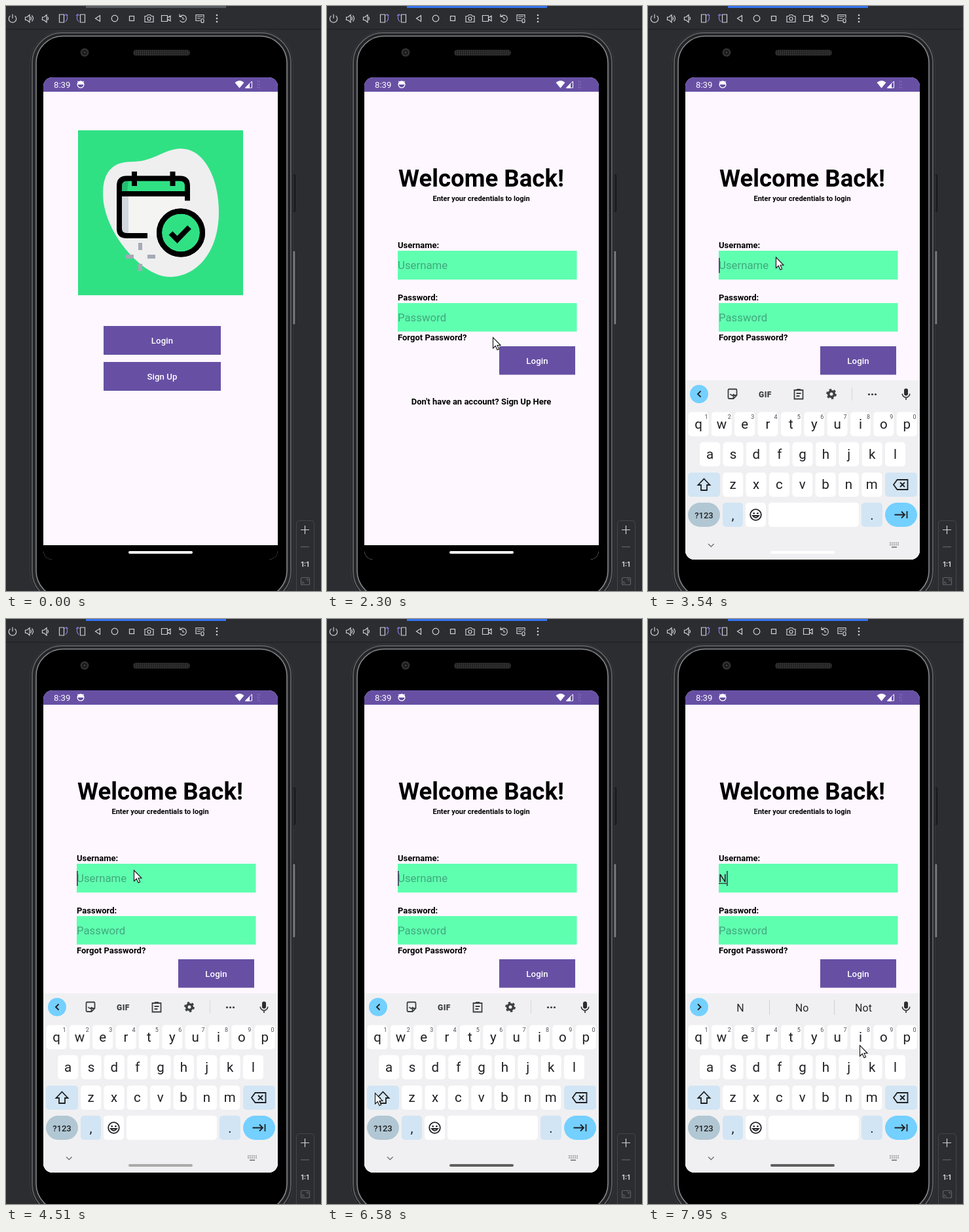
Recreate the animation shown at these times as an HTML page. Size 481 by 894 pixels, loop 8000 ms.

```html
<!DOCTYPE html>
<html lang="en">
<head>
<meta charset="utf-8">
<title>Login demo</title>
<style>
  html, body { margin: 0; width: 100%; height: 100%; overflow: hidden; background: #2b2d30; }
  svg { display: block; width: 481px; height: 894px; font-family: Roboto, sans-serif; }
  .mid { text-anchor: middle; }
  .bold { font-weight: 700; }
  .line { fill: none; stroke: #ced0d6; stroke-width: 1.2; }
  .ink { fill: none; stroke: #3c4043; stroke-width: 1.8; }
  .btn { fill: #fff; font-size: 13.2px; font-weight: 500; letter-spacing: .1px; text-anchor: middle; }
  .label { font-size: 13px; font-weight: 700; }
  .hint { font-size: 16.8px; fill: #40a87b; }
  .key { font-size: 20.5px; fill: #1f2023; text-anchor: middle; }
  .num { font-size: 9px; fill: #4a4d50; text-anchor: middle; }
  .word { font-size: 16px; fill: #26282b; text-anchor: middle; }
</style>
</head>
<body>
<svg viewBox="0 0 481 894" xmlns="http://www.w3.org/2000/svg">
  <defs>
    <clipPath id="glass"><rect x="57" y="109" width="358" height="737" rx="14"/></clipPath>
    <clipPath id="disc"><circle cx="267" cy="346" r="33"/></clipPath>
    <pattern id="mesh" width="3" height="3" patternUnits="userSpaceOnUse">
      <rect width="3" height="3" fill="#1c1c1c"/><circle cx="1.5" cy="1.5" r=".9" fill="#454545"/>
    </pattern>
  </defs>

  <!-- emulator toolbar -->
  <rect width="481" height="894" fill="#2b2d30"/>
  <rect y="35" width="481" height="1" fill="#1e1f22"/>
  <rect id="strip" x="122" width="214" height="3" fill="#5a5d63"/>
  <g class="line">
    <path d="M6.5 15a5.7 5.7 0 1 0 7 0M10 12.500v6.500"/>
    <path id="speaker" d="M29.500 17v4.500h2.500l4 3.500v-11.500l-4 3.500z"/>
    <path d="M37.500 16.500q2 2.500 0 5M39.500 14.500q4 4.500 0 9"/>
    <path d="M55.500 17v4.500h2.500l4 3.500v-11.500l-4 3.500zM63.500 16.500q2 2.500 0 5"/>
    <path d="M81.500 13h7v12h-7zM107.500 0" />
    <path d="M113.500 13h7v12h-7z"/>
    <path d="M90.500 24q5-4 2-10M89.500 14.500l2.500-2 2.500 2.500M111.500 24q-5-4-2-10M112 14.500l-2.500-2-2.500 2.500" stroke="#8478d8"/>
    <path d="M143.500 14.500v9l-7-4.500z"/>
    <circle cx="166" cy="19" r="4.800"/>
    <rect x="188.500" y="15.500" width="7" height="7"/>
    <path d="M212 15.500h3l1.500-2h4l1.500 2h3v9h-13z"/><circle cx="218.500" cy="19.500" r="2.500"/>
    <path d="M237.500 14.500h9v9h-9zM246.500 18l4.500-3v8l-4.500-3"/>
    <path d="M266 16a5.300 5.300 0 1 1-.5 6M265 12.500v4h4M270 17v3h2.500"/>
    <path d="M297 22.500h-7v-9h12v5M292 16h8M292 19h5"/><rect x="298" y="19.500" width="4" height="6" rx="2"/>
  </g>
  <g fill="#ced0d6"><circle cx="322" cy="14" r="1.300"/><circle cx="322" cy="19" r="1.300"/><circle cx="322" cy="24" r="1.300"/></g>

  <!-- handset -->
  <rect x="437.500" y="258" width="4" height="56" rx="1" fill="#232326" stroke="#111"/>
  <rect x="437.500" y="374" width="4.500" height="113" rx="1" fill="#77797c" stroke="#1a1a1c"/>
  <g fill="none">
    <rect x="37" y="38.500" width="401" height="875" rx="49" fill="#1d1e20" stroke="#3d3e41"/>
    <rect x="40" y="41" width="395" height="869" rx="46" stroke="#5b5d60" stroke-width="2"/>
    <rect x="43.500" y="44.500" width="387" height="862" rx="43" stroke="#25262a" stroke-width="3"/>
    <rect x="46" y="46" width="383" height="858" rx="41" fill="#000" stroke="#85878a" stroke-width="1.600"/>
  </g>
  <rect x="194" y="67" width="87" height="9" rx="4.500" fill="url(#mesh)"/>
  <circle cx="120" cy="71" r="6.500" fill="#303030"/><circle cx="120" cy="71" r="3.500" fill="#151515"/><circle cx="120" cy="71" r="1.500" fill="#444"/>

  <g clip-path="url(#glass)">
    <rect x="57" y="109" width="358" height="737" fill="#fef7ff"/>

    <g id="home">
      <rect x="110" y="190" width="252" height="252" fill="#30e184"/>
      <path d="M267 218C303 218 325 264 325 315C325 375 292 414 250 414C208 414 148 345 148 287C148 250 166 238 192 238C226 238 242 218 267 218Z" fill="#efefef"/>
      <path d="M173 263h104v34l-40 54h-64z" fill="#f4f4f3"/>
      <path d="M177 290h10v57h-10z" fill="#d2d7de"/>
      <path d="M177 267h96v17h-96z" fill="#30e184"/><path d="M177 267h10l-2 17h-8z" fill="#25bd70"/>
      <g fill="none" stroke="#000" stroke-width="8">
        <path d="M277 297.500V275Q277 263.500 266 263.500H184Q173 263.500 173 275V340Q173 351 184 351H216M173 287H277M196 253v22M254.500 253v22"/>
        <circle cx="267" cy="346.500" r="33" fill="#30e184"/>
        <path d="M259 310a38 38 0 0 0 3 72h-30v-72z" fill="#25bd70" stroke="none" clip-path="url(#disc)"/>
        <circle cx="267" cy="346.500" r="33"/>
        <path d="M251.500 347l10 10 18.500-19"/>
      </g>
      <path d="M202 362h6v11h-6zM202 394h6v11h-6zM183 380h12v6h-12zM216 380h12v6h-12z" fill="#a6a9b6"/>
      <path d="M149 489h179v44h-179zM149 544h179v44h-179z" fill="#6750a4"/>
      <text class="btn" x="238.500" y="516">Login</text>
      <text class="btn" x="238.500" y="571">Sign Up</text>
    </g>

    <g id="login" opacity="0">
      <rect x="57" y="131" width="358" height="715" fill="#fef7ff"/>
      <text class="mid bold" x="235.500" y="276" font-size="36.600">Welcome Back!</text>
      <text class="mid bold" x="235.500" y="298" font-size="11">Enter your credentials to login</text>
      <path d="M108 374h273.500v44h-273.500zM108 454h273.500v43.500h-273.500z" fill="#5fffb0"/>
      <text class="label" x="108" y="370">Username:</text>
      <text class="label" x="108" y="450">Password:</text>
      <text class="label" x="108" y="511">Forgot Password?</text>
      <text class="label mid" x="235.500" y="609">Don't have an account? Sign Up Here</text>
      <text id="user" class="hint" x="108" y="402">Username</text>
      <rect id="under" x="108" y="403.500" width="12" height="1.200" fill="#222"/>
      <rect id="caret" y="385" width="1.800" height="23" fill="#4d4668"/>
      <text class="hint" x="108" y="482">Password</text>
      <rect x="263" y="520" width="116" height="43.500" fill="#6750a4"/>
      <text class="btn" x="321" y="547">Login</text>
    </g>

    <rect x="57" y="109" width="358" height="22" fill="#6750a4"/>
    <text x="73" y="125" font-size="13.200" fill="#fff">8:39</text>
    <circle cx="114" cy="120" r="4.900" fill="none" stroke="#fff" stroke-width="1.300"/>
    <path d="M109.500 119.500a4.500 4.500 0 0 1 9 0zM109 115l2 1M119 115l-2 1" fill="#fff" stroke="#fff"/>
    <path d="M349.500 117q7.500-6 14 0l-7 8.500z" fill="#fff"/>
    <path d="M375.500 115v10h-10z" fill="none" stroke="#fff"/><path d="M372 118v7.500h-7z" fill="#fff"/>
    <path d="M384.500 114v13M387 115v11" stroke="#8b78bd" stroke-dasharray="2 2.500" fill="none"/>

    <g id="board" opacity="0"></g>
    <rect id="nav" x="57" y="824" width="358" height="22"/>
  </g>
  <rect id="pill" x="187" y="833" width="98" height="4" rx="2" fill="#fff"/>

  <!-- zoom controls -->
  <rect x="443.500" y="786.500" width="27" height="120" rx="4" fill="#2b2d30" stroke="#43454a"/>
  <path class="line" d="M450 800.500h13M456.500 794v13"/>
  <g class="line" style="stroke:#5f6268"><path d="M450 826.500h13"/><rect x="450.500" y="873.500" width="13" height="11" rx="2"/><path d="M453 879v3h3M461 879v-3h-3"/></g>
  <text class="mid bold" x="456.500" y="857" font-size="10.500" fill="#ced0d6" style="font-family:Inter,sans-serif">1:1</text>

  <path id="mouse" d="M.5.5V17L4.300 13.500 7 19.500 9.600 18.400 7 12.500H12Z" fill="#fff" stroke="#111" stroke-width="1.100"/>
</svg>

<script>
const $ = id => document.getElementById(id);
const LOOP = 8000, PITCH = 35.35;

// ---- keyboard ----
const box = (x, y, w, fill, r = 5) =>
  `<rect x="${x}" y="${y}" width="${w}" height="37" rx="${r}" fill="${fill}"/>`;
const row = (letters, x, y, digits) => [...letters].map((c, i) => {
  const cx = x + i * PITCH;
  return box(cx - 15.5, y, 31, '#fff') +
    `<text class="key letter" x="${cx}" y="${y + 25}">${c}</text>` +
    (digits ? `<text class="num" x="${cx + 12}" y="${y + 10}">${(i + 1) % 10}</text>` : '');
}).join('');
const dots = (x, y, gap, n, r) =>
  Array.from({ length: n }, (_, i) => `<circle cx="${x + i * gap}" cy="${y}" r="${r}"/>`).join('');
const pale = '#d2e5f4', sky = '#74d0ff';

$('board').innerHTML = `
  <rect x="57" y="572" width="358" height="300" fill="#f0f0f2"/>
  <circle cx="78" cy="593" r="14" fill="${sky}"/>
  <path id="chev" class="ink" style="stroke:#1f2023"/>
  <g id="tools">
    <path class="ink" d="M122.500 587q0-1.500 1.500-1.500h10q1.500 0 1.500 1.500v8l-5 5h-6.500q-1.500 0-1.500-1.500zM130.500 600v-5h5M125.500 593q3 4 6 0"/>
    <text class="mid" x="179" y="597.500" font-size="12" font-weight="900" letter-spacing=".5" fill="#3c4043">GIF</text>
    <path class="ink" d="M223.500 587h13v13.500h-13zM226.500 592h7M226.500 596h5M227 586h6"/>
    <circle cx="280" cy="593" r="4.300" fill="none" stroke="#3c4043" stroke-width="3.600"/>
    <circle cx="280" cy="593" r="6.700" fill="none" stroke="#3c4043" stroke-width="2.400" stroke-dasharray="3.500 3.516"/>
    <path d="M311.500 583v20" stroke="#d5d6d9"/>
    <g fill="#3c4043">${dots(337.5, 593.5, 5, 3, 1.6)}</g>
  </g>
  <g id="words">
    <text class="word" x="141" y="599.500">N</text><text class="word" x="235" y="599.500">No</text><text class="word" x="329" y="599.500">Not</text>
    <path d="M185.500 582v23M284.500 582v23" stroke="#cfd0d3"/>
  </g>
  <rect x="391" y="584.500" width="6" height="11" rx="3" fill="#2c2e31"/>
  <path class="ink" style="stroke:#2c2e31;stroke-width:1.600" d="M388.300 592.500a5.700 5.700 0 0 0 11.400 0M394 598v4"/>
  ${row('qwertyuiop', 77, 620.5, true)}
  ${row('asdfghjkl', 94.7, 666.5)}
  ${box(61, 713, 49, pale)}${row('zxcvbnm', 129.7, 713)}${box(362, 713, 49, pale)}
  <path id="shift" class="ink" style="stroke:#1f2023" d="M85.500 722.500l9 9.500h-4.500v8h-9v-8h-4.500z"/>
  <path class="ink" style="stroke:#1f2023" d="M375 731.500l5.500-7.500h16v15h-16zM385 728l7 7M392 728l-7 7"/>
  ${box(61, 759, 49, '#b1c7d3', 18.5)}${box(114, 759, 31, pale)}${box(149, 759, 31, '#fff')}
  ${box(184, 759, 138, '#fff')}${box(326, 759, 32, pale)}${box(362, 759, 49, sky, 18.5)}
  <text class="mid" x="85.500" y="783" font-size="13" font-weight="500" fill="#1f2023">?123</text>
  <text class="key" x="129.500" y="785">,</text><text class="key" x="342" y="785">.</text>
  <circle class="ink" style="stroke:#1f2023" cx="164.500" cy="777.500" r="8.300"/>
  <path class="ink" style="stroke:#1f2023" d="M160 779q4.500 6 9 0z"/>
  <g fill="#1f2023">${dots(161.7, 775.3, 5.7, 2, 1.3)}</g>
  <path class="ink" style="stroke:#1f2023" d="M376.500 777.500h15M387 772.500l5 5-5 5M395.500 772v11"/>
  <path class="ink" style="stroke:#777;stroke-width:1.500" d="M92 822l4.300 4.300 4.300-4.300"/>
  <g fill="#8a8b8e">${[820.5, 823.5].map(y => dots(370, y, 3, 5, 1)).join('')}<rect x="372" y="826" width="8" height="2"/></g>`;

const letters = [...document.querySelectorAll('.letter')];

// ---- timing ----
// [start, end, number of picture steps]
const bursts = [[260, 1020, 12], [2020, 2780, 12], [2910, 2980, 2], [3120, 3540, 7],
  [5070, 5830, 11], [5890, 6170, 5], [6370, 7120, 11], [7190, 7950, 11]];

// pointer: [ms, x, y]
const route = [[260, 425, 882], [470, 374, 782], [740, 301, 612], [1020, 257, 512], [1349, 257, 512],
  [1350, 255, 508.5], [2020, 255, 508.5], [2089, 253, 506], [2310, 253, 506], [2500, 206, 454],
  [2780, 195, 369], [2900, 195, 369], [2980, 195, 383.5], [5070, 195, 383.5], [5222, 255, 299],
  [5374, 342, 420], [5526, 240, 690], [5678, 22, 829], [5830, 121, 755], [6030, 85, 742],
  [6170, 73, 724], [6710, 73, 724], [6900, 190, 764], [7120, 302, 735], [7550, 302, 735], [7950, 323, 651]];
const rise = [[3120, 0], [3190, .08], [3260, .3], [3330, .577], [3400, .82], [3470, .95], [3540, 1]];
const blinks = [3120, 3740, 4230, 4790, 5270, 5800, 6300, 6800, 7300];
const TYPED = 7470, CAPS = 6710;

function tick(t) {
  const b = bursts.find(([a, z]) => t >= a && t < z);
  if (!b) return t;
  const d = (b[1] - b[0]) / (b[2] - 1);
  return b[0] + Math.floor((t - b[0]) / d + 1e-6) * d;
}

function track(rows, t) {
  const i = rows.findIndex(r => r[0] > t);
  if (i < 0) return rows.at(-1).slice(1);
  if (i === 0) return rows[0].slice(1);
  const a = rows[i - 1], b = rows[i], p = (t - a[0]) / (b[0] - a[0]);
  return a.slice(1).map((v, k) => v + (b[k + 1] - v) * p);
}

const set = (id, name, value) => $(id).setAttribute(name, value);
const show = (id, on) => set(id, 'visibility', on ? 'visible' : 'hidden');

function render(t) {
  const s = tick(t);
  const [x, y] = track(route, s);
  set('mouse', 'transform', `translate(${x} ${y})`);
  show('mouse', t >= 260);

  set('strip', 'fill', t < 2020 ? '#5a5d63' : '#3574f0');
  const fade = t < 2020 ? 0 : Math.min(1, (s - 2020) / 207 + 1 / 3);
  set('home', 'opacity', 1 - fade);
  set('login', 'opacity', fade);

  const [up] = track(rise, s);
  set('board', 'transform', `translate(0 ${274 * (1 - up)})`);
  set('board', 'opacity', up);
  set('nav', 'opacity', 1 - up);

  const dim = t < 3680 ? 0 : Math.min(6, Math.floor((t - 3680) / 277.5) + 1);
  const g = dim ? 245 - 25 * dim : 255;
  set('pill', 'fill', `rgb(${g},${g},${g})`);

  const typed = t >= TYPED, caps = t >= CAPS && !typed;
  show('caret', blinks.filter(b => b <= t).length % 2);
  set('caret', 'x', typed ? 120 : 108);
  show('under', typed);
  $('user').textContent = typed ? 'N' : 'Username';
  $('user').style.fill = typed ? '#1d1b20' : '';
  show('tools', !typed);
  show('words', typed);
  set('chev', 'd', typed ? 'M76 588.500l4.500 4.500-4.500 4.500' : 'M80.500 588.500l-4.500 4.500 4.500 4.500');
  $('shift').style.fill = caps ? '#1f2023' : 'none';
  for (const l of letters) {
    const c = l.textContent;
    l.textContent = caps ? c.toUpperCase() : c.toLowerCase();
  }
}

const start = performance.now();
function loop() {
  render((performance.now() - start) % LOOP);
  requestAnimationFrame(loop);
}
loop();
</script>
</body>
</html>
```
